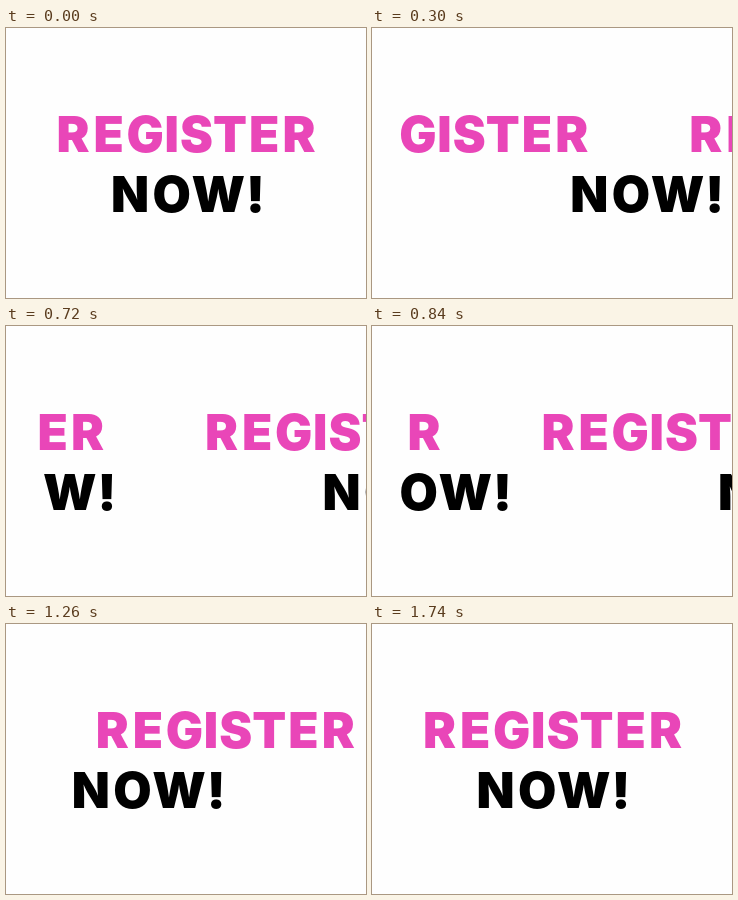
An HTML page with a canvas for the animation above (1.8 s loop, 360 by 270 pixels).

```html
<!DOCTYPE html>
<html lang="en">
<head>
<meta charset="utf-8">
<title>Register now!</title>
<style>
  html, body { margin: 0; width: 100%; height: 100%; overflow: hidden; background: #fefefe; }
  canvas { display: block; }
</style>
</head>
<body>
<canvas id="stage" width="360" height="270" role="img" aria-label="Register now!"></canvas>
<script>
const W = 360, H = 270, LOOP = 1800, STEP = 60;
const EDGE = 5; // a letter wraps as a whole once its left side passes this margin
const ctx = document.getElementById('stage').getContext('2d');

// xs: centre of each letter at rest
const lines = [
  { text: 'REGISTER', xs: [68, 103, 139, 166, 190.5, 224, 258.5, 294], y: 124, color: '#e946b8', dir: -1 },
  { text: 'NOW!', xs: [124, 165.5, 212.5, 249.5], y: 184, color: '#000', dir: 1 }
];

const wrap = x => ((x - EDGE) % W + W) % W + EDGE;

function drawLine({ text, xs, y, color, dir }, shift) {
  ctx.fillStyle = color;
  [...text].forEach((letter, i) => {
    const { actualBoundingBoxLeft: left, actualBoundingBoxRight: right } = ctx.measureText(letter);
    const x = wrap(xs[i] - (left + right) / 2 + dir * shift);
    ctx.fillText(letter, x + left, y);
  });
}

function draw(now) {
  const time = Math.floor(now % LOOP / STEP) * STEP;
  const shift = W * Math.sin(time / LOOP * Math.PI / 2); // sine ease-out
  ctx.fillStyle = '#fefefe';
  ctx.fillRect(0, 0, W, H);
  ctx.font = '900 49.5px Inter, Lato, sans-serif';
  lines.forEach(line => drawLine(line, shift));
}

function tick() {
  draw(performance.now());
  requestAnimationFrame(tick);
}
tick();
</script>
</body>
</html>
```
